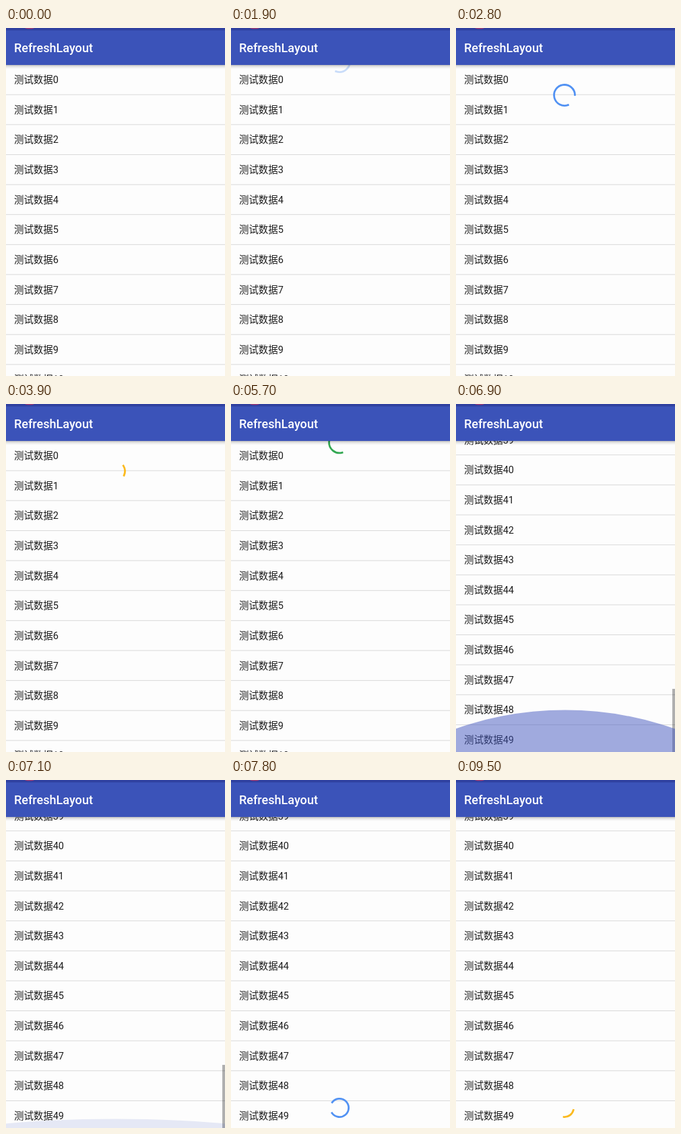
Write an HTML page that moves like this. It is 325x518 px and loops after 9600 ms.

```html
<!DOCTYPE html>
<html lang="zh-CN">
<head>
<meta charset="utf-8">
<title>RefreshLayout</title>
<style>
  html, body { margin: 0; width: 100%; height: 100%; overflow: hidden; background: #fdfdfd; }
  svg { display: block; width: 100%; height: 100%; }
  text { font-family: Roboto, "Noto Sans CJK SC", "Noto Sans CJK", sans-serif; }
  #rows text { font-size: 14.44px; fill: #1c1c1c; }
  #rows rect { fill: #d9d9d9; }
  .ring { fill: none; stroke-width: 2.8; stroke-linecap: square; }
</style>
</head>
<body>
<svg viewBox="0 0 325 518">
  <defs>
    <linearGradient id="shade" x1="0" y1="0" x2="0" y2="1">
      <stop offset="0" stop-color="#000" stop-opacity=".26"/>
      <stop offset=".4" stop-color="#000" stop-opacity=".1"/>
      <stop offset="1" stop-color="#000" stop-opacity="0"/>
    </linearGradient>
  </defs>
  <rect width="325" height="518" fill="#fdfdfd"/>
  <g id="rows"></g>
  <rect id="thumb" x="321" width="4" height="98" fill="#000"/>
  <ellipse id="glow" cx="162" fill="#3f55bd"/>
  <path id="topRing" class="ring"/>
  <path id="endRing" class="ring"/>
  <rect y="55" width="325" height="6" fill="url(#shade)"/>
  <rect width="325" height="55" fill="#3b53b9"/>
  <rect width="325" height="3.5" fill="#2f40a0"/>
  <ellipse cx="35" cy="-1" rx="8" ry="2.3" fill="#a83a70"/>
  <text x="12" y="36" font-size="18.06" font-weight="500" fill="#fff">RefreshLayout</text>
</svg>
<script>
const LOOP = 9600, STEP = 100, ROW = 44.63, CYCLE = 1332, FINISH = 666;
const COLORS = [[82, 146, 243], [251, 186, 32], [52, 168, 83]];
const $ = id => document.getElementById(id);
const clamp = v => Math.max(0, Math.min(1, v));
const mix = (a, b, k) => a + (b - a) * k;

// Piecewise linear value through [time, value] points.
function track(t, pts) {
  if (t <= pts[0][0]) return pts[0][1];
  for (let i = 1; i < pts.length; i++) {
    const [t0, v0] = pts[i - 1], [t1, v1] = pts[i];
    if (t <= t1) return mix(v0, v1, (t - t0) / (t1 - t0));
  }
  return pts[pts.length - 1][1];
}

// cubic-bezier(.4, 0, .2, 1)
function ease(x) {
  let lo = 0, hi = 1, u = .5;
  for (let i = 0; i < 24; i++) {
    u = (lo + hi) / 2;
    const v = 1 - u;
    if (1.2 * v * v * u + .6 * v * u * u + u * u * u < x) lo = u; else hi = u;
  }
  return 3 * (1 - u) * u * u + u * u * u;
}

function tint(i, phase) {
  const a = COLORS[i % 3], b = COLORS[(i + 1) % 3], k = clamp((phase - .75) * 4);
  return `rgb(${a.map((v, j) => Math.round(mix(v, b[j], k)))})`;
}

// Pulled ring before `begin`, then the closing sweep, then full cycles.
function ringPose(t, begin, pull, turns) {
  const e = t - begin;
  if (e < 0) return { start: pull.rot, sweep: 288 * pull.grow, color: tint(0, 0) };
  if (e < FINISH) {
    const q = e / FINISH;
    return { start: mix(pull.rot, 360, q) + 288 * q, sweep: 288 * (1 - q), color: tint(0, q) };
  }
  const n = (e - FINISH) / CYCLE, c = Math.floor(n), u = n - c;
  const head = ease(clamp(2 * u)), tail = ease(clamp(2 * u - 1));
  return {
    start: 288 * (c + 1) + 306 * n + turns[c] + 288 * tail,
    sweep: 288 * (head - tail),
    color: tint(c + 1, u)
  };
}

function drawRing(el, cy, r, pose, alpha) {
  el.style.display = alpha > 0 ? "" : "none";
  if (alpha <= 0) return;
  const sweep = Math.max(1, pose.sweep);
  const point = deg => {
    const a = deg * Math.PI / 180;
    return `${(161 + r * Math.cos(a)).toFixed(2)} ${(cy + r * Math.sin(a)).toFixed(2)}`;
  };
  el.setAttribute("d", `M${point(pose.start)}A${r} ${r} 0 ${sweep > 180 ? 1 : 0} 1 ${point(pose.start + sweep)}`);
  el.setAttribute("stroke", pose.color);
  el.setAttribute("stroke-opacity", alpha);
}

function drawTop(t) {
  const y = t < 5500
    ? track(t, [[1900, 50], [2300, 92], [2500, 106], [2650, 107], [2800, 100]])
    : track(t, [[5500, 100], [5800, 36]]);
  const pull = {
    grow: track(t, [[1900, .43], [2300, 1]]),
    rot: track(t, [[1900, -14], [2300, 27], [2600, 70]])
  };
  const alpha = t < 1900 || t >= 5800 ? 0 : track(t, [[2300, .3], [2600, 1]]);
  drawRing($("topRing"), y, 15.5, ringPose(Math.min(t, 5400), 3080, pull, [5, 199]), alpha);
}

function drawEnd(t) {
  const y = track(t, [[7200, 520], [7300, 475], [7400, 428], [7500, 403], [7600, 403], [7700, 455], [7800, 488]]);
  const pull = {
    grow: track(t, [[7200, .1], [7400, 1]]),
    rot: track(t, [[7200, -35], [7400, 60], [7550, 217]])
  };
  const alpha = t < 7300 ? 0 : track(t, [[7350, .3], [7600, 1]]);
  drawRing($("endRing"), y, 13.6, ringPose(t, 7860, pull, [14, 14]), alpha);
}

function drawGlow(t) {
  const rise = clamp((t - 6700) / 200), fall = clamp((t - 6900) / 400);
  const k = t <= 6900 ? 1 - (1 - rise) ** 2 : (1 - fall) ** 2;
  const glow = $("glow"), r = 487.5;
  glow.setAttribute("rx", r);
  glow.setAttribute("ry", r * k);
  glow.setAttribute("cy", 520.8 + (r - 65.3) * k);
  glow.setAttribute("fill-opacity", k > 0 ? .49 * k : 0);
}

function drawList(t) {
  const s = track(t, [[6200, 0], [6300, 190], [6400, 605], [6500, 1011], [6600, 1405], [6700, 1764]]);
  $("rows").setAttribute("transform", `translate(0 ${-s})`);
  $("thumb").setAttribute("y", 55 + s * .2092);
  $("thumb").setAttribute("fill-opacity", t < 6300 ? 0 : track(t, [[7100, .31], [7500, 0]]));
}

function render(t) {
  drawList(t);
  drawGlow(t);
  drawTop(t);
  drawEnd(t);
}

let rows = "";
for (let i = 0; i < 50; i++) {
  rows += `<text x="12" y="${82.1 + ROW * i}">测试数据${i}</text>` +
    `<rect y="${98.7 + ROW * i}" width="325" height="1"/>`;
}
$("rows").innerHTML = rows;

const origin = performance.now();
function tick() {
  const t = (performance.now() - origin) % LOOP;
  render(Math.floor(t / STEP) * STEP);
  requestAnimationFrame(tick);
}
tick();
</script>
</body>
</html>
```
